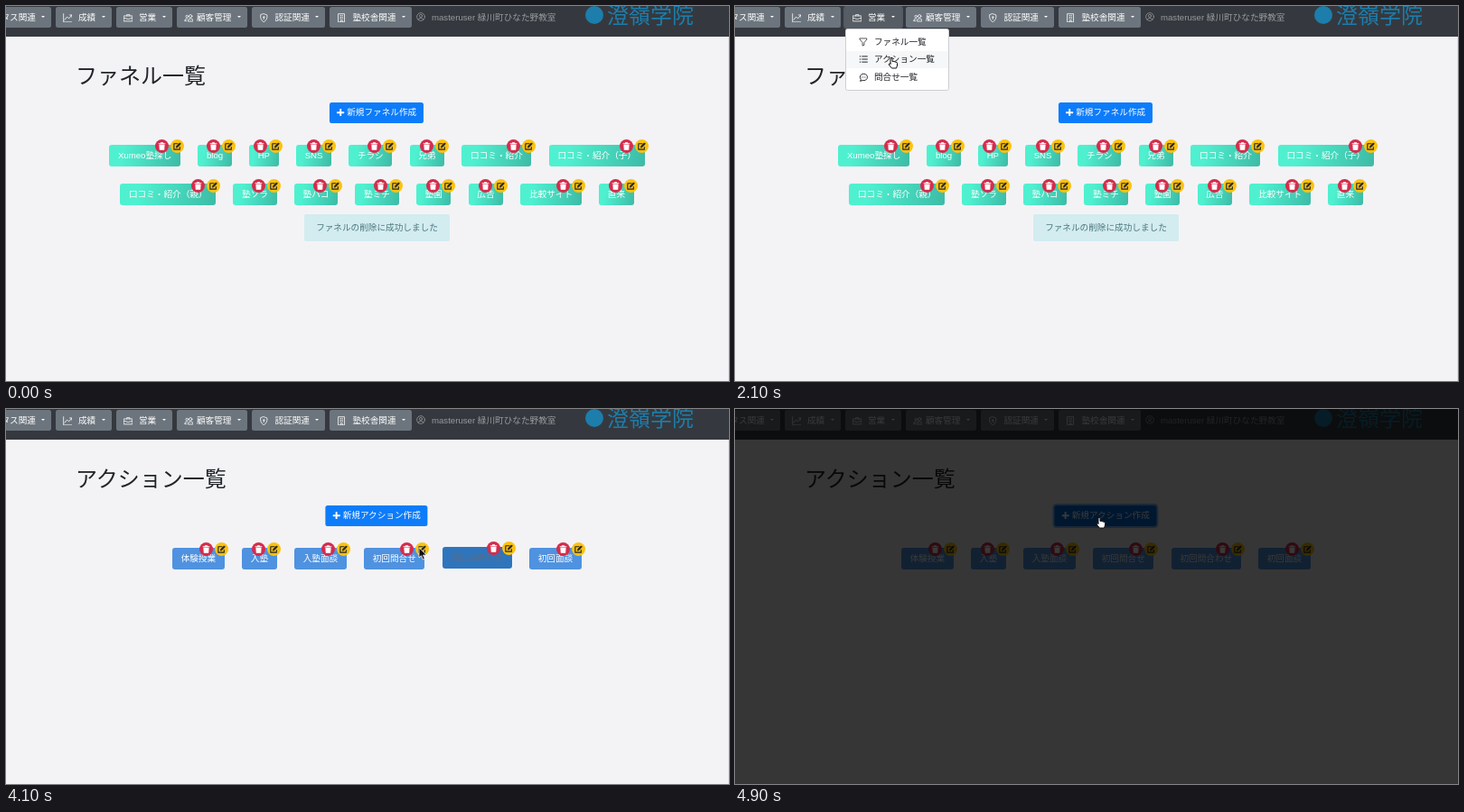
Animation of 800 by 416 pixels, one loop 5 s. Source, as an HTML page:

```html
<!DOCTYPE html>
<html lang="ja">
<head>
<meta charset="utf-8">
<title>ファネル一覧</title>
<style>
html, body { margin: 0; width: 100%; height: 100%; overflow: hidden; }
body {
  background: #f3f3f5; color: #212529;
  font: 9.65px/14px "Liberation Sans", "Noto Sans CJK JP", "Noto Sans CJK", sans-serif;
}
#stage { position: relative; width: 800px; height: 416px; overflow: hidden; white-space: nowrap; }
#stage::after { content: ""; position: absolute; right: 0; top: 34px; width: 1px; height: 382px; background: #e2e2e5; }
.abs, nav, nav *, .page, .page > *, .menu, .menu *, .dot, #shade, #cursor, #cursor svg { position: absolute; }
svg { display: block; fill: none; stroke: currentColor; stroke-width: 1.2; stroke-linecap: round; stroke-linejoin: round; }

nav { left: 0; top: 0; width: 800px; height: 34px; background: #35393f; color: #fff; }
.tab { top: 1px; height: 23px; border-radius: 2.5px; background: #6c757d; }
.tab span { top: 4.5px; }
.tab svg { left: 7.5px; top: 6.5px; }
.tab i { right: 7px; top: 10px; border: 2.9px solid transparent; border-top-color: #fff; border-bottom: 0; }
.user { left: 471px; top: 5.5px; color: #989b9e; }
.mark { left: 641px; top: 0; width: 20px; height: 20px; border-radius: 50%; background: #1d7dab; }
.brand { left: 665px; top: -1.5px; font-size: 24px; line-height: 24px; font-weight: 500; color: #1d7dab; }

.page { left: 0; top: 0; width: 821px; height: 416px; }
h1 { margin: 0; left: 77px; top: 63px; font-size: 24px; line-height: 30px; font-weight: 400; }
.row { left: 0; width: 821px; height: 24px; display: flex; justify-content: center; gap: 19.3px; }
.chip { position: relative; padding: 0 9.65px; line-height: 24px; color: #fff; border-radius: 3px; }
#funnel .chip { background: linear-gradient(100deg, #4ff0d0 20%, #3dbba6); }
#action .chip { background: #4f92e0; }
.dot { top: -5.5px; width: 15px; height: 15px; border-radius: 50%; }
.dot svg { position: absolute; left: 3px; top: 3px; }
.trash { right: 12.5px; background: #d52c4c; color: #fff; }
.edit { right: -4.5px; background: #fcc20f; color: #212529; }
.create {
  left: 410.2px; top: 106.5px; height: 23px; padding: 0 8px; transform: translateX(-50%);
  display: flex; align-items: center; gap: 2.6px; border-radius: 2.5px; background: #0d7cfa; color: #fff;
}
.note {
  left: 330px; top: 231px; width: 161px; height: 30px; line-height: 30px; text-align: center;
  border-radius: 2px; background: #d3ecf0; color: #4a777d;
}
.menu {
  left: 122px; top: 25px; width: 113px; height: 67px; background: #fff;
  border: 1px solid #ccced0; border-radius: 2.5px;
}
.menu div { left: 0; width: 113px; height: 19.3px; }
.menu svg { left: 14px; top: 4.5px; }
.menu span { left: 31px; top: 2.5px; }
#shade { left: 0; top: 0; width: 800px; height: 416px; background: #000; z-index: 2; }
#cursor { left: 0; top: 0; z-index: 3; }
#cursor svg { left: -1px; top: -1px; stroke-width: 1; }

/* One shared clock; values hold for each 100 ms step. */
#funnel, #action, .menu, #shade, #cursor, #arrow, #hand, #sales, #hint, #hover, #add {
  animation: 5s step-end -4ms infinite;
}
#funnel { animation-name: funnel; }
#action { animation-name: action; }
.menu { animation-name: menu; }
#sales { animation-name: sales; }
#hint { animation-name: hint; }
#hover { animation-name: hover; }
#add { animation-name: add; }
#shade { animation-name: shade; }
#arrow { animation-name: arrow; }
#hand { animation-name: hand; }
#cursor { animation-name: travel; }

@keyframes funnel { 0% { visibility: visible } 46%, 100% { visibility: hidden } }
@keyframes action { 0% { visibility: hidden } 46%, 100% { visibility: visible } }
@keyframes menu { 0% { visibility: hidden } 16% { visibility: visible } 46%, 100% { visibility: hidden } }
@keyframes sales {
  0%, 46%, 100% { background: #6c757d; box-shadow: none }
  12% { background: #5a6268; box-shadow: none }
  14% { background: #565d64; box-shadow: 0 0 0 2px #535a62 }
}
@keyframes hint { 0% { background: #fff } 30%, 100% { background: #f6f7f8 } }
@keyframes hover {
  0%, 84%, 100% { background: #4f92e0; color: #fff; top: 0 }
  74% { background: #2e75bd; color: #5b6c85; top: -1px }
}
@keyframes add {
  0% { background: #0d7cfa; box-shadow: none }
  88% { background: #0069d9; box-shadow: none }
  92%, 100% { background: #0069d9; box-shadow: 0 0 0 2px #7fb9f8 }
}
@keyframes shade { 0% { opacity: 0 } 94% { opacity: .08 } 96% { opacity: .42 } 98%, 100% { opacity: .778 } }
@keyframes arrow {
  0% { visibility: hidden } 2% { visibility: visible } 12% { visibility: hidden }
  46% { visibility: visible } 88%, 100% { visibility: hidden }
}
@keyframes hand {
  0% { visibility: hidden } 12% { visibility: visible }
  46% { visibility: hidden } 88%, 100% { visibility: visible }
}
@keyframes travel {
  0% { transform: translate(214px, 134px) }
  2% { transform: translate(214px, 134px); animation-timing-function: steps(5) }
  12% { transform: translate(169px, 18px) }
  24% { transform: translate(169px, 18px); animation-timing-function: steps(4) }
  32% { transform: translate(171px, 55px) }
  38% { transform: translate(172px, 57px) }
  46% { transform: translate(172px, 57px); animation-timing-function: steps(3) }
  52% { transform: translate(176px, 58px) }
  62% { transform: translate(176px, 58px); animation-timing-function: steps(3) }
  68% { transform: translate(476px, 276px); animation-timing-function: steps(2) }
  72% { transform: translate(490px, 176px); animation-timing-function: steps(2) }
  76% { transform: translate(530px, 162px); animation-timing-function: steps(3) }
  82% { transform: translate(457px, 154px); animation-timing-function: steps(4) }
  90%, 100% { transform: translate(402px, 120px) }
}
</style>
</head>
<body>
<svg width="0" height="0" style="position:absolute">
  <symbol id="chart" viewBox="0 0 16 16"><path d="M1 1v14h14M3 11l4-5 3 3 5-6M11.500 3H15v3.500"/></symbol>
  <symbol id="case" viewBox="0 0 16 16"><path d="M1 4.500h14v9H1zM5.500 4.500V2.500h5v2M1 8l7 2 7-2"/></symbol>
  <symbol id="people" viewBox="0 0 16 16"><circle cx="11" cy="5" r="2.500"/><circle cx="5" cy="5.500" r="2"/><path d="M6.500 13q0-4 4.500-4t4.500 4zM5.500 9Q1 9 1 13h3"/></symbol>
  <symbol id="shield" viewBox="0 0 16 16"><path d="M8 1l5.500 2q1 8-5.500 12Q1.500 11 2.500 3zM8 7.500v2.500"/><circle cx="8" cy="6.500" r="1"/></symbol>
  <symbol id="building" viewBox="0 0 16 16"><path d="M3 1h10v14H3zM6.500 15v-3h3v3M6 4h1m2 0h1M6 6.500h1m2 0h1M6 9h1m2 0h1"/></symbol>
  <symbol id="person" viewBox="0 0 16 16"><circle cx="8" cy="8" r="7"/><circle cx="8" cy="6.300" r="2.500"/><path d="M3.500 13q1-3 4.500-3t4.500 3"/></symbol>
  <symbol id="filter" viewBox="0 0 16 16"><path d="M2 1.500h12v2L9.500 9v4.500l-3 1V9L2 3.500z"/></symbol>
  <symbol id="list" viewBox="0 0 16 16"><path d="M6 3h9M6 8h9M6 13h9M2 3h1M2 8h1M2 13h1" stroke-width="1.600"/></symbol>
  <symbol id="chat" viewBox="0 0 16 16"><path d="M3 14.500l.6-2.800a6.500 6 0 1 1 3 1.900q-1.500.8-3.600.9zM5 8h.1M8 8h.1M11 8h.1" stroke-width="1.500"/></symbol>
  <symbol id="plus" viewBox="0 0 16 16"><path d="M8 1.500v13M1.500 8h13" stroke-width="3.600"/></symbol>
  <symbol id="bin" viewBox="0 0 16 16"><path d="M2 3h12M6 1.500h4M3.500 6h9l-.6 8.500H4.100z" fill="currentColor" stroke-width="2"/></symbol>
  <symbol id="pen" viewBox="0 0 16 16"><path d="M9 3H1.500v11.500H13V10" stroke-width="2"/><path d="M6 10.500l.5-2.500L13 1.500 15 3.500 8.500 10z" fill="currentColor"/></symbol>
</svg>

<div id="stage">
  <nav>
    <div class="user">masteruser 緑川町ひなた野教室</div>
    <div class="mark"></div>
    <div class="brand">澄嶺学院</div>
  </nav>
  <div class="page" id="funnel">
    <h1>ファネル一覧</h1>
    <div class="create">新規ファネル作成</div>
    <div class="row" style="top:153.500px">Xumeo塾探し,blog,HP,SNS,チラシ,兄弟,口コミ・紹介,口コミ・紹介（子）</div>
    <div class="row" style="top:197px">口コミ・紹介（親）,塾ソラ,塾ハコ,塾ミチ,塾園,広告,比較サイト,直来</div>
    <div class="note">ファネルの削除に成功しました</div>
  </div>
  <div class="page" id="action">
    <h1>アクション一覧</h1>
    <div class="create" id="add">新規アクション作成</div>
    <div class="row" style="top:153.500px">体験授業,入塾,入塾面談,初回問合せ,初回問合わせ,初回面談</div>
  </div>
  <div class="menu"></div>
  <div id="shade"></div>
  <div id="cursor">
    <svg id="arrow" width="11" height="15" viewBox="0 0 11 15"><path d="M1 1v11l2.500-2.300L5.300 14l2-.9-1.800-4H9z" fill="#111" stroke="#fff" stroke-width=".8"/></svg>
    <svg id="hand" width="12" height="15" viewBox="0 0 12 15" style="left:-3px"><path d="M3 8V2q1-1.800 2 0v3.500q1.300-.8 2 .3 1.200-.6 1.800.5 1.700-.4 1.700 1.200v2.500L9.500 13h-5L1.200 9q-.2-1.600 1.800-1z" fill="#fff" stroke="#111"/></svg>
  </div>
</div>

<script>
const $ = s => document.querySelector(s);
const icon = (name, size) => `<svg width="${size}" height="${size}"><use href="#${name}"/></svg>`;

// left, right, label, label offset, icon
const tabs = [
  [-40, 50, 'タス関連', 34.4],
  [55, 117, '成績', 25, 'chart'],
  [122, 184, '営業', 25, 'case'],
  [189, 267, '顧客管理', 22, 'people'],
  [272, 353, '認証関連', 25.5, 'shield'],
  [358, 449, '塾校舎関連', 25.5, 'building']
];
$('nav').insertAdjacentHTML('afterbegin', tabs.map(([l, r, label, x, name]) =>
  `<div class="tab"${name === 'case' ? ' id="sales"' : ''} style="left:${l}px;width:${r - l}px">` +
  `${name ? icon(name, 10.5) : ''}<span style="left:${x}px">${label}</span><i></i></div>`).join(''));
$('.user').insertAdjacentHTML('beforebegin',
  `<div style="left:454px;top:7px;color:#989b9e">${icon('person', 10)}</div>`);

const items = [['filter', 'ファネル一覧'], ['list', 'アクション一覧'], ['chat', '問合せ一覧']];
$('.menu').innerHTML = items.map(([name, label], i) =>
  `<div${i === 1 ? ' id="hint"' : ''} style="top:${4.5 + i * 19.3}px">${icon(name, 10)}<span>${label}</span></div>`).join('');

const dots = `<b class="dot trash">${icon('bin', 9)}</b><b class="dot edit">${icon('pen', 9)}</b>`;
document.querySelectorAll('.row').forEach(row => {
  row.innerHTML = row.textContent.split(',').map(label =>
    `<div class="chip"${label === '初回問合わせ' ? ' id="hover"' : ''}>${label}${dots}</div>`).join('');
});
document.querySelectorAll('.create').forEach(el => el.insertAdjacentHTML('afterbegin', icon('plus', 8.5)));
</script>
</body>
</html>
```
